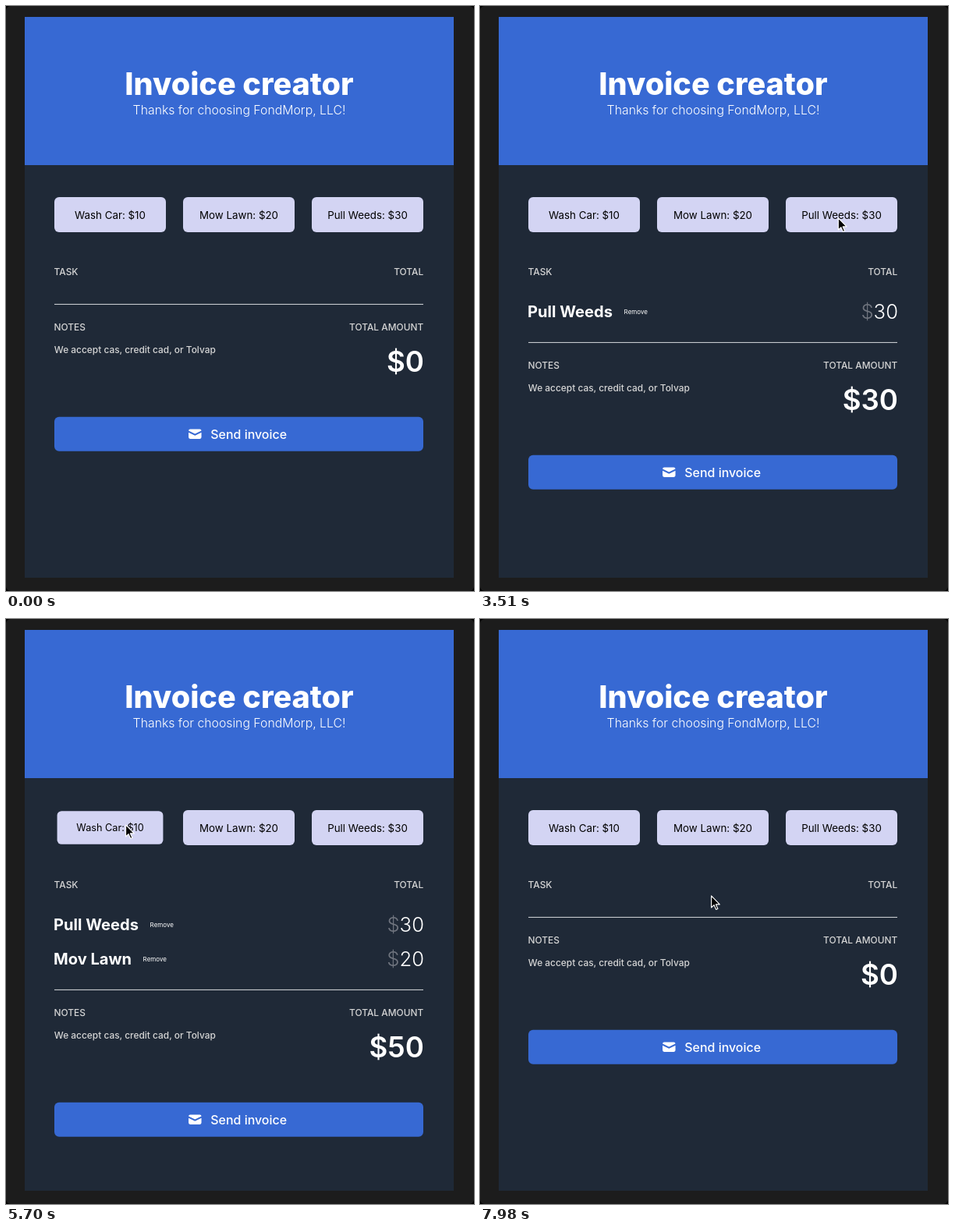
Recreate the animation shown at these times as an HTML page. Size 600 px wide and 750 px high, loop 8 s.

```html
<!DOCTYPE html>
<html lang="en">
<head>
<meta charset="utf-8">
<title>Invoice creator</title>
<style>
  html, body { margin: 0; width: 100%; height: 100%; overflow: hidden; background: #000; }
  svg { display: block; width: 600px; height: 750px; }
  text { font-family: Inter, "Open Sans", sans-serif; font-optical-sizing: none; fill: #fff; white-space: pre; }
  .title { font-size: 39.6px; font-weight: 800; }
  .sub { font-size: 15.8px; font-weight: 300; }
  .btn rect { fill: #d3d4f3; }
  .btn text { font-size: 13.35px; fill: #000; }
  .label { font-size: 11.92px; font-weight: 500; fill: #d5d5d5; }
  .sum { font-size: 36.67px; font-weight: 600; }
  .send { font-size: 15.95px; font-weight: 500; }
  .task { font-size: 20.1px; font-weight: 700; }
  .remove { font-size: 8px; }
  .price { font-size: 25.67px; font-weight: 300; }
  .price tspan { fill: #70757f; }
  .mid { text-anchor: middle; }
  .end { text-anchor: end; }
</style>
</head>
<body>
<svg viewBox="0 0 600 750">
  <rect width="600" height="750" rx="6" fill="#1c1c1c"/>
  <rect x="24" y="14" width="550" height="719" fill="#1f2937"/>
  <rect x="24" y="14" width="550" height="190" fill="#3769d3"/>
  <text class="title mid" x="299" y="114">Invoice creator</text>
  <text class="sub mid" x="299" y="139">Thanks for choosing FondMorp, LLC!</text>
  <g id="buttons"></g>
  <text class="label" x="61.5" y="345">TASK</text>
  <text class="label end" x="535.3" y="345">TOTAL</text>
  <g id="rows"></g>
  <g id="foot">
    <rect x="62" y="381.9" width="473" height="1.1" fill="#c6c9ce"/>
    <text class="label" x="61.5" y="416">NOTES</text>
    <text class="label end" x="535.3" y="416">TOTAL AMOUNT</text>
    <text class="label" x="61.8" y="444.5">We accept cas, credit cad, or Tolvap</text>
    <text class="sum end" id="sum" x="536" y="468.5">$0</text>
    <rect x="62" y="526.7" width="473" height="44" rx="6" fill="#3769d3"/>
    <path transform="translate(232 538.4) scale(1.03)" fill="#fff"
      d="M2 5.9L10 9.9l8-4A2 2 0 0016 4H4a2 2 0 00-2 1.9zM18 8.1l-8 4-8-4V14a2 2 0 002 2h12a2 2 0 002-2z"/>
    <text class="send" x="262.3" y="554.5">Send invoice</text>
  </g>
  <g id="pointer">
    <g id="ring" fill="none">
      <circle r="21.3" cy="1" stroke="#e4e4ea" stroke-width="3"/>
      <circle r="21.3" cy="1" stroke="#000" stroke-width="1.6"/>
    </g>
    <path d="M.6 .8V16l3.5-3.3 2.6 5.7 2.2-1-2.5-5.5h4.9z" fill="#000" stroke="#fff" stroke-width="1.1" stroke-linejoin="round"/>
  </g>
</svg>
<script>
const LOOP = 8000, STEP = 30;
const $ = id => document.getElementById(id);

const services = [["Wash Car", 10], ["Mow Lawn", 20], ["Pull Weeds", 30]];
const tasks = [["Pull Weeds", 30, 184.6], ["Mov Lawn", 20, 175.6], ["Wash Car", 10, 170.8]];

$("buttons").innerHTML = services.map(([name, cost], i) => {
  const x = 62 + 165 * i;
  return `<g class="btn"><rect x="${x}" y="245" width="143" height="45" rx="6"/>
    <text class="mid" x="${x + 71.5}" y="272.5">${name}: $${cost}</text></g>`;
}).join("");

$("rows").innerHTML = tasks.map(([name, cost, x], i) => `<g transform="translate(0 ${44 * i})">
  <text class="task" x="61" y="399.2">${name}</text>
  <text class="remove" x="${x}" y="395">Remove</text>
  <text class="price end" x="536" y="401.3"><tspan>$</tspan>${cost}</text></g>`).join("");

const buttons = [...$("buttons").children], rows = [...$("rows").children];

const sine = k => (1 - Math.cos(Math.PI * k)) / 2;
const out = p => k => 1 - (1 - k) ** p;

// start, end, from, to, easing, optional bend point
const moves = [
  [360, 840, [606, 556], [531, 538], out(2)],
  [1080, 1540, [531, 538], [470, 361], sine],
  [1740, 2340, [470, 361], [460, 271], sine],
  [3480, 3960, [460, 271], [330, 273], sine],
  [5100, 5550, [330, 273], [153, 263], sine],
  [6075, 6660, [153, 263], [200, 671], out(3.4), [148, 467]],
  [7650, 7980, [200, 671], [296, 354], k => k ** 1.4]
];

// press, ring off, release, button, tasks listed after release
const clicks = [
  [2580, 2760, 2790, 2, 1],
  [4080, 4290, 4320, 1, 2],
  [5580, 5700, 5730, 0, 3],
  [6840, 6990, 7020, -1, 0]
];

function pointerAt(t) {
  const [start, end, a, b, ease, bend] = moves.findLast(m => t >= m[0]) || moves[0];
  const u = ease(Math.max(0, Math.min(1, (t - start) / (end - start))));
  return a.map((v, i) => {
    const c = bend ? bend[i] : (v + b[i]) / 2;
    return (1 - u) ** 2 * v + 2 * u * (1 - u) * c + u * u * b[i];
  });
}

function draw(t) {
  const done = clicks.findLast(c => t >= c[2]);
  const count = done ? done[4] : 0;
  const held = clicks.find(c => t >= c[0] && t < c[2]);

  rows.forEach((row, i) => row.style.display = i < count ? "" : "none");
  $("foot").setAttribute("transform", `translate(0 ${count ? 5 + 44 * count : 0})`);
  $("sum").textContent = "$" + tasks.slice(0, count).reduce((s, task) => s + task[1], 0);

  buttons.forEach((button, i) => {
    const x = 133.5 + 165 * i, y = 267.5;
    const scale = held && held[3] === i ? 0.95 : 1;
    button.setAttribute("transform", `translate(${x} ${y}) scale(${scale}) translate(${-x} ${-y})`);
  });

  $("pointer").style.display = t < 390 ? "none" : "";
  $("pointer").setAttribute("transform", `translate(${pointerAt(t).join(" ")})`);
  $("ring").style.display = held && t < held[1] ? "" : "none";
}

const begin = performance.now();
function tick() {
  const t = (performance.now() - begin) % LOOP;
  draw(Math.floor(t / STEP) * STEP);
  requestAnimationFrame(tick);
}
tick();
</script>
</body>
</html>
```
